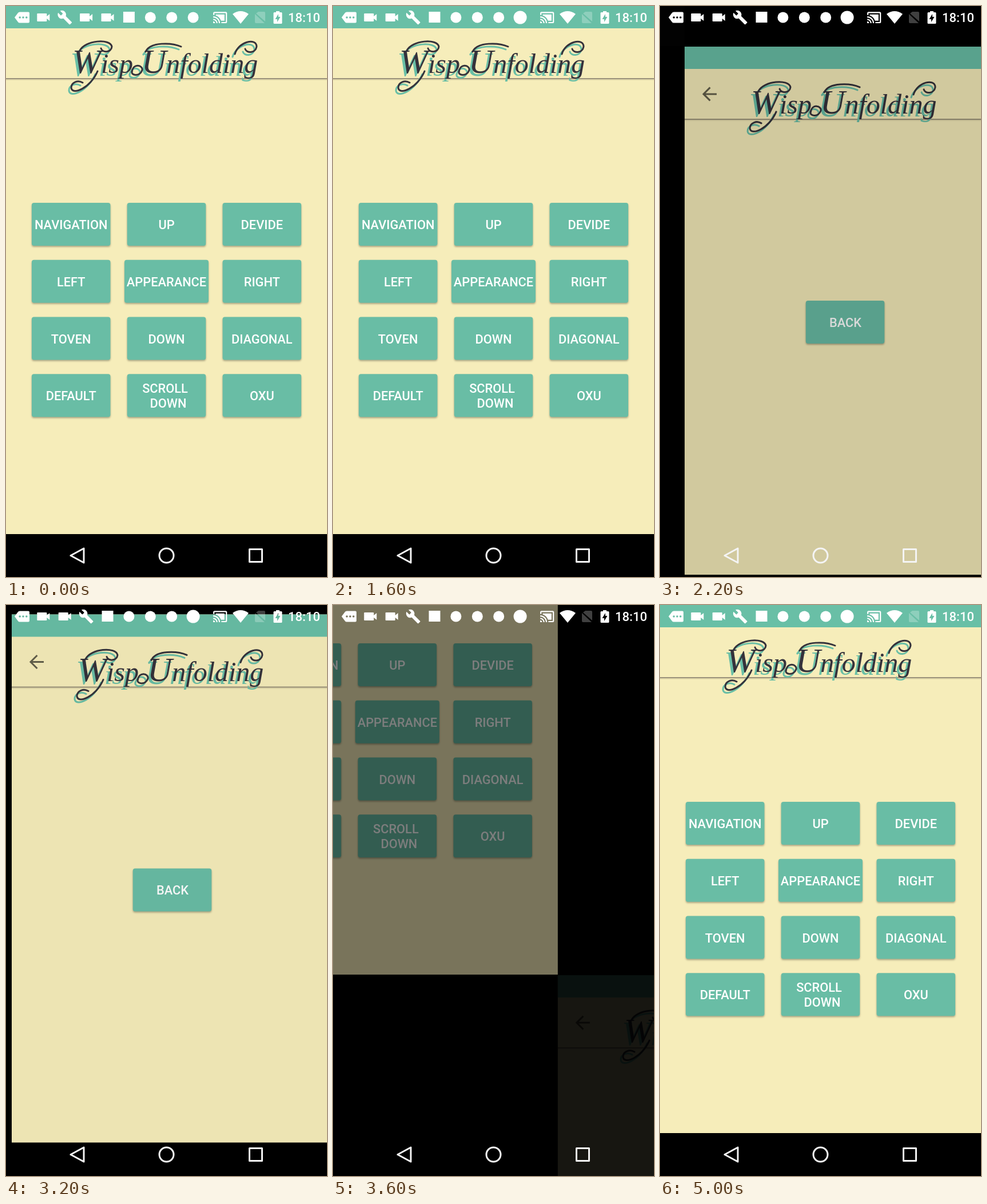
Write an HTML page that moves like this. It is 561 by 998 pixels and loops after 5.1 s.

```html
<!DOCTYPE html>
<html lang="en">
<head>
<meta charset="utf-8">
<title>Diagonal page transition</title>
<style>
html, body { margin: 0; width: 100%; height: 100%; overflow: hidden; background: #000; }
svg { display: block; width: 100%; height: 100%; }
.label, .clock { font: 500 21.8px Roboto, sans-serif; fill: #fff; text-anchor: middle; }
.clock { font-size: 22px; }
.button { fill: #69bda5; filter: drop-shadow(0 2px 1.5px rgba(0, 0, 0, .3)); }
.title { font: italic 48px "Liberation Serif", serif; }
.title .cap { font-size: 60px; }
.swash { fill: none; stroke-width: 3; stroke-linecap: round; }
.nav { fill: none; stroke: #f4f4f4; stroke-width: 3; stroke-linejoin: round; }
</style>
</head>
<body>
<svg viewBox="0 0 561 998">
  <defs>
    <g id="lettering">
      <text class="title" y="117" stroke="none"><tspan class="cap" x="116">W</tspan>isp <tspan class="cap" x="237">U</tspan>nfolding</text>
      <path class="swash" d="M160 114C148 143 116 157 114 143C114 133 126 129 134 134
        M129 78C138 60 182 56 185 71C184 82 168 82 166 74
        M244 80C252 62 290 64 306 71
        M220 116C222 98 240 104 238 112C234 124 218 122 220 114
        M400 84C406 62 438 55 438 71C436 83 420 83 418 75"/>
    </g>
    <g id="header">
      <path fill="#f6edba" d="M0 0h561v923H0z"/>
      <path fill="#69bfa6" d="M0 0h561v39H0z"/>
      <path fill="#9b927a" d="M0 126h561v2H0z"/>
      <path fill="#000" opacity=".08" d="M0 128h561v2H0z"/>
      <use href="#lettering" x="-4" y="5" fill="#69bfa6" stroke="#69bfa6"/>
      <use href="#lettering" fill="#35323b" stroke="#35323b"/>
    </g>
    <path id="camera" d="M-10-7H5q1 0 1 1v4l5-4V6L6 2v4q0 1-1 1H-10q-1 0-1-1V-6q0-1 1-1z"/>
    <path id="wrench" transform="translate(-13.4 -13.4) scale(1.12)" d="M22.7 19l-9.1-9.1c.9-2.3.4-5-1.5-6.9-2-2-5-2.4-7.4-1.3L9 6 6 9 1.6 4.7C.4 7.1.9 10.1 2.9 12.1c1.9 1.9 4.6 2.4 6.9 1.5l9.1 9.1c.4.4 1 .4 1.4 0l2.3-2.3c.5-.4.5-1.1.1-1.4z"/>
    <path id="square" d="M-10-10h20v19h-20z"/>
    <circle id="dot" r="9.5"/>
    <circle id="disc" r="11.5"/>
  </defs>

  <path d="M0 0h561v998H0z"/>
  <g id="menu"><use href="#header"/></g>
  <g id="detail">
    <use href="#header"/>
    <path d="M56 83H34M44.500 71.500L33 83l11.500 11.500" fill="none" stroke="#625f4a" stroke-width="3"/>
  </g>

  <g fill="#fff">
    <path fill-rule="evenodd" d="M15 20l6-8q1-1.500 3-1.500h15q2 0 2 2v15q0 2-2 2H24q-2 0-3-1.500z
      M22.400 20a1.800 1.800 0 1 0 3.600 0a1.800 1.800 0 1 0-3.600 0
      M28.200 20a1.800 1.800 0 1 0 3.600 0a1.800 1.800 0 1 0-3.600 0
      M34 20a1.800 1.800 0 1 0 3.600 0a1.800 1.800 0 1 0-3.600 0"/>
    <g id="before"></g>
    <g id="after"></g>
    <path transform="translate(361 7) scale(1.1)" d="M21 3H3c-1.1 0-2 .9-2 2v3h2V5h18v14h-7v2h7c1.1 0 2-.9 2-2V5c0-1.1-.9-2-2-2zM1 18v3h3c0-1.660-1.340-3-3-3zm0-4v2c2.760 0 5 2.240 5 5h2c0-3.870-3.130-7-7-7zm0-4v2c4.970 0 9 4.030 9 9h2c0-6.080-4.930-11-11-11zM19 7H5v1.600c4 1.300 7.100 4.400 8.400 8.400H19z"/>
    <path d="M410 31L396 14q14-10 28 0z"/>
    <path opacity=".25" d="M441 10h10q2 0 2 2v15l-16-14zM435 14l17 16H437q-2 0-2-2z"/>
    <path fill-rule="evenodd" d="M472 11v-2h6v2h3q1.500 0 1.500 1.500v17q0 1.500-1.500 1.500H469q-1.500 0-1.500-1.500v-17q0-1.500 1.500-1.500z
      M476 14l-5.500 9h3.500v5l5.500-9H476z"/>
    <text class="clock" x="521" y="28">18:10</text>
  </g>
  <g class="nav">
    <path d="M136 948v25l-23-12.500zM425.500 949.500h22v22h-22z"/>
    <circle cx="280.500" cy="960.500" r="12.500"/>
  </g>
</svg>
<script>
const $ = id => document.getElementById(id);
const add = (id, markup) => $(id).insertAdjacentHTML("beforeend", markup);

const label = (text, x, y) => `<text class="label" x="${x}" y="${y}">${text}</text>`;
const box = (x, y, w = 137.5) =>
  `<rect class="button" x="${x - w / 2}" y="${y}" width="${w}" height="75" rx="4"/>`;

const names = ["NAVIGATION", "UP", "DEVIDE", "LEFT", "APPEARANCE", "RIGHT",
  "TOVEN", "DOWN", "DIAGONAL", "DEFAULT", "SCROLL DOWN", "OXU"];
names.forEach((name, i) => {
  const x = 113.7 + i % 3 * 166.8, y = 344 + Math.floor(i / 3) * 99.75;
  const [first, second] = name.split(" ");
  add("menu", box(x, y, name === "APPEARANCE" ? 147 : 137.5) + (second
    ? label(first, x - 2.5, y + 33) + label(second, x + 3, y + 58.5)
    : label(name, x, y + 46)));
});
add("detail", box(280.5, 444) + label("BACK", 281, 490));

const iconRow = (id, icons) => icons.split(" ").forEach((icon, i) =>
  add(id, `<g transform="translate(${65.3 + i * 37.4} 20)"><use href="#${icon}"/></g>`));
iconRow("before", "camera wrench camera camera square dot dot dot");
iconRow("after", "camera camera wrench square dot dot dot disc");

// Piecewise-linear progress through [time, value] points
function along(points, t) {
  const i = points.findIndex(p => p[0] > t);
  if (i === 0) return points[0][1];
  if (i < 0) return points[points.length - 1][1];
  const [t0, v0] = points[i - 1], [t1, v1] = points[i];
  return v0 + (v1 - v0) * (t - t0) / (t1 - t0);
}
const ease = v => (1 - Math.cos(Math.PI * v)) / 2;
const opening = [[1607, 0], [2329, 1]];
const closing = [[3138, 0], [3200, .0852], [3400, .3457], [3800, .9167], [3860, 1]];

// shift: -1 is fully up-left, 0 in place, 1 fully down-right
function place(id, shift) {
  $(id).setAttribute("transform", `translate(${561 * shift} ${924 * shift})`);
  $(id).setAttribute("opacity", (1 - Math.abs(shift)) ** 2);
}

function draw(now) {
  const t = Math.floor(now % 5100 / 100) * 100; // ten pictures a second
  const open = ease(along(opening, t)) - ease(along(closing, t));
  place("menu", -open);
  place("detail", 1 - open);
  $("before").style.display = t < 300 ? "" : "none";
  $("after").style.display = t < 300 ? "none" : "";
}

const start = performance.now();
function tick() {
  draw(performance.now() - start);
  requestAnimationFrame(tick);
}
tick();
</script>
</body>
</html>
```
